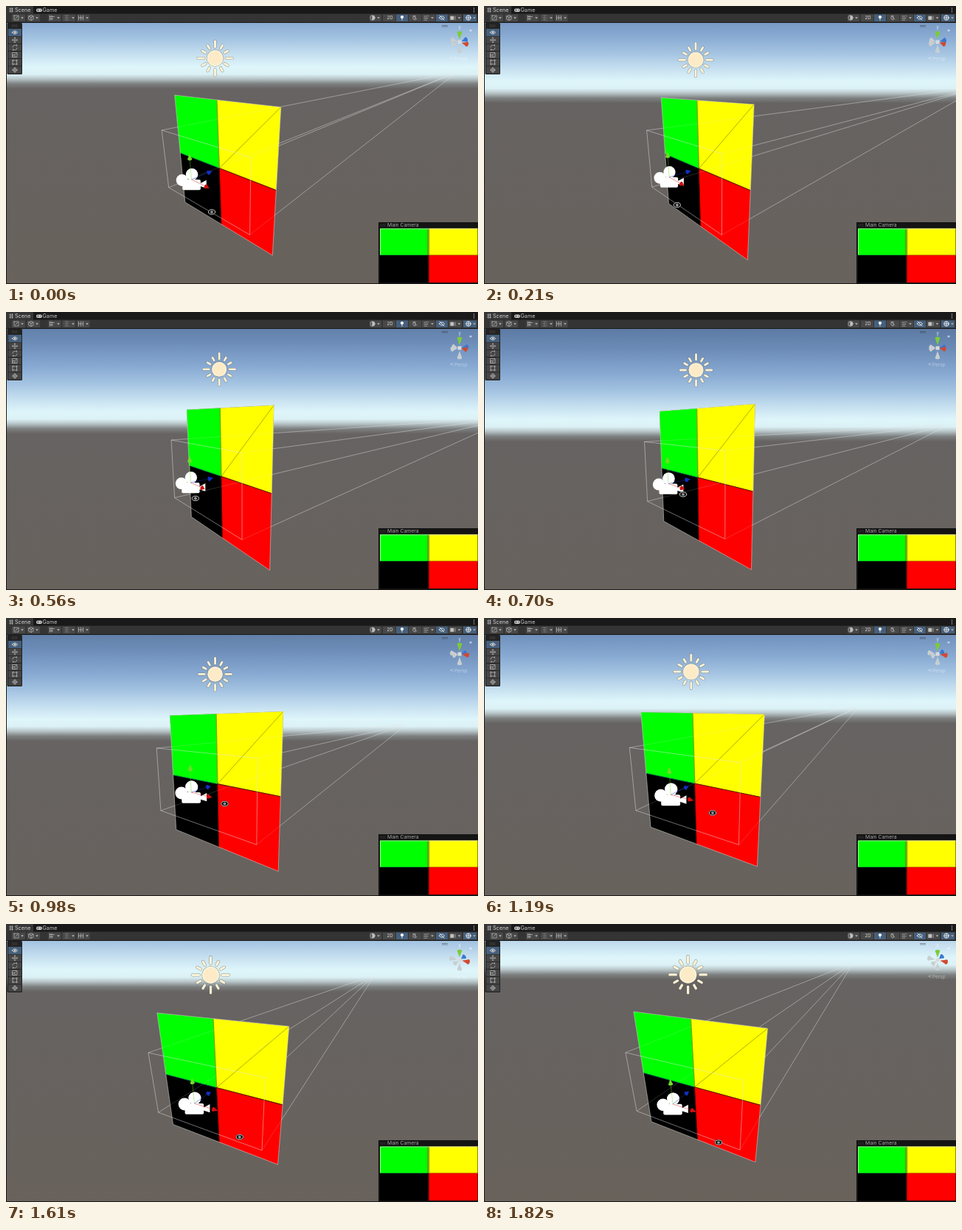
Write an HTML page with a canvas that moves like this. It is 640x378 px and loops after 1.89 s.

```html
<!DOCTYPE html>
<html lang="en">
<head>
<meta charset="utf-8">
<title>Scene orbit</title>
<style>
  html, body { margin: 0; width: 640px; height: 378px; overflow: hidden; background: #282828; }
  canvas, svg { position: absolute; left: 0; top: 0; display: block; }
  text { font-family: Inter, Roboto, sans-serif; }
  .icon { fill: none; stroke: #b4b4b4; stroke-width: .8; stroke-linecap: round; stroke-linejoin: round; }
  .button { fill: #484848; }
  .on { fill: #46607c; }
</style>
</head>
<body>
<canvas id="scene" width="640" height="378"></canvas>
<svg width="640" height="378" viewBox="0 0 640 378">
  <defs>
    <linearGradient id="top">
      <stop offset=".475" stop-color="#0f0"/><stop offset=".495" stop-color="#5c9c00"/>
      <stop offset=".515" stop-color="#ff0"/>
    </linearGradient>
    <linearGradient id="bottom">
      <stop offset=".49" stop-color="#000"/><stop offset=".51" stop-color="#f00"/>
    </linearGradient>
    <path id="caret" d="M-1.8 -.8h3.6L0 1.4z" fill="#bbb"/>
    <path id="eye" d="M-3.6 0Q0 -4.4 3.6 0Q0 4.4 -3.6 0z"/>
  </defs>

  <!-- tabs, toolbar and view border -->
  <rect width="640" height="11" fill="#191919"/>
  <rect width="37" height="11" fill="#363636"/>
  <rect y="10.5" width="640" height="11.5" fill="#343434"/>
  <path d="M0 22.5h640M.5 22v356M0 377.5h640" stroke="#1b1b1b"/>
  <path class="icon" d="M4.5 4h5M4.5 7h5M6 2.5v6M8.5 2.5v6"/>
  <text x="12" y="8.2" font-size="7.2" fill="#d4d4d4">Scene</text>
  <rect x="41" y="3.5" width="8" height="4.5" rx="2.2" fill="#c8c8c8"/>
  <path d="M42.5 5.7h2M43.5 4.7v2M46 5.7h1.5" stroke="#222" stroke-width=".7"/>
  <text x="49.5" y="8.2" font-size="7.2" fill="#c8c8c8">Game</text>
  <path d="M634.5 2.5v6" stroke="#c8c8c8" stroke-width="1.2" stroke-dasharray="1.2 1.2"/>

  <g class="button">
    <rect x="8" y="11.5" width="18" height="9.5"/><rect x="28.5" y="11.5" width="17.5" height="9.5"/>
    <rect x="57" y="11.500" width="17.500" height="9.500"/><rect x="76.500" y="11.500" width="17.500" height="9.500"/>
    <rect x="96" y="11.500" width="17.500" height="9.500"/><rect x="493" y="11.500" width="16" height="9.500"/>
    <rect x="511" y="11.500" width="17" height="9.500"/><rect x="546" y="11.500" width="17" height="9.500"/>
    <rect x="564" y="11.500" width="18" height="9.500"/><rect x="600" y="11.500" width="18" height="9.500"/>
  </g>
  <g class="on">
    <rect x="529" y="11.500" width="16" height="9.500"/>
    <rect x="583" y="11.500" width="16" height="9.500"/>
    <rect x="620" y="11.500" width="18" height="9.500"/>
  </g>
  <g class="icon">
    <rect x="11" y="13" width="6" height="6" stroke-dasharray="1.5 1"/><path d="M13 17l3 -3"/>
    <path d="M31 14l3 -1.5l3 1.5v4l-3 1.5l-3 -1.5zM31 14l3 1.5l3 -1.5M34 15.5v4"/>
    <path d="M59.5 13v6M62 13v6M59.5 14.5h6M59.5 17.5h4"/>
    <path d="M80 13h5M80 16h5M80 19h5M82 13v6" stroke="#777"/>
    <path d="M98.5 13v6M101.5 13v6M104.5 13v6M98.5 16h6"/>
    <circle cx="497" cy="16" r="3.2"/><path d="M497 13a3 3 0 0 1 0 6z" fill="#c4c4c4"/>
    <circle cx="537" cy="15" r="1.7" fill="#fff" stroke="#fff"/><path d="M537 17v2.2" stroke="#fff"/>
    <path d="M552 14.5v3l3 1.5v-5.5zM557 18l-5 -5"/>
    <path d="M567 14h4M567 16.5h5M567 19h4M572 13l1 1"/>
    <use href="#eye" x="591" y="16" stroke="#fff"/><path d="M588 13l6 6" stroke="#fff"/>
    <rect x="603" y="14" width="4" height="4.5" fill="#c4c4c4"/><path d="M609 14v4.5"/>
    <circle cx="627" cy="16" r="3.2" stroke="#fff"/><path d="M624 16h6M627 13v6" stroke="#fff"/>
  </g>
  <use href="#caret" x="22" y="16"/><use href="#caret" x="42" y="16"/>
  <use href="#caret" x="71" y="16"/><use href="#caret" x="91" y="16"/>
  <use href="#caret" x="110" y="16"/><use href="#caret" x="505" y="16"/>
  <use href="#caret" x="578" y="16"/><use href="#caret" x="614.5" y="16"/>
  <use href="#caret" x="635" y="16"/>
  <text x="516.5" y="18.3" font-size="6" fill="#ddd">2D</text>

  <!-- tool strip -->
  <rect x="1.5" y="23" width="20.5" height="70" rx="1.5" fill="#232323"/>
  <path d="M8 26h8M8 28h8" stroke="#555" stroke-dasharray="1 1"/>
  <path d="M12 41.5v50.500" stroke="#454545" stroke-width="18" stroke-dasharray="9.400 .8"/>
  <rect class="on" x="3" y="31" width="18" height="10"/>
  <g class="icon" transform="translate(12 36)">
    <use href="#eye" stroke="#eee"/><circle r="1.2" fill="#eee"/>
    <path d="M-3.5 10.3h7M0 6.8v7M-1 7.8l1 -1l1 1M-1 12.8l1 1l1 -1M-2.5 9.3l-1 1l1 1M2.5 9.3l1 1l-1 1"/>
    <path d="M-3 20a3 3 0 0 1 5.5 -1.5v-2M3 21a3 3 0 0 1 -5.5 1.5v2"/>
    <path d="M-3 27.5h6v6h-6zM-3 33.5v-3h3v3M0 30.5l2 -2"/>
    <path d="M-2.5 38h5v5h-5zM-3.5 38h1v-1M3.5 43h-1v1M2.5 37v1h1M-2.5 44v-1h-1"/>
    <path d="M-3.5 51h7M0 47.5v7"/><circle cy="51" r="2.5"/>
  </g>

  <!-- view widget extras -->
  <path d="M591 26.5h8M591 28h8" stroke="#333" stroke-opacity=".6" stroke-width=".7"/>
  <rect x="628.5" y="32" width="3" height="2.5" fill="#fff" fill-opacity=".55"/>
  <path d="M606.5 69.5l-4 1.5l4 1.5" fill="none" stroke="#fff" stroke-opacity=".4" stroke-width=".8"/>
  <text x="608" y="73.5" font-size="6.5" fill="#fff" fill-opacity=".45">Persp</text>

  <!-- camera preview -->
  <rect x="505" y="294" width="135" height="84" fill="#141414"/>
  <path d="M507.5 297h7M507.5 299h7" stroke="#555" stroke-width=".8" stroke-dasharray="1 1"/>
  <text x="517" y="300.3" font-size="6.8" fill="#a8a8a8">Main Camera</text>
  <rect x="507" y="302.5" width="132.5" height="36.5" fill="url(#top)"/>
  <rect x="507" y="339" width="132.5" height="37" fill="url(#bottom)"/>
  <path d="M507.5 339v-36h132" fill="none" stroke="#e4ecdc" stroke-opacity=".7"/>
  <path d="M507 338.5h67" stroke="#083" stroke-opacity=".6"/>
  <path d="M574 338.700h65.500" stroke="#a40" stroke-opacity=".7"/>
</svg>
<script>
const ctx = document.getElementById('scene').getContext('2d');
const LOOP = 1890, STEP = 70;
const CX = 320, CY = 200, FOCAL = 308.3;

// Pointer drag: time, x, y. Its position sets the orbit angles.
const drag = [
  [0, 279, 280], [420, 250.5, 261], [700, 270, 248], [980, 296.5, 252.5],
  [1190, 310, 265], [1400, 315, 281], [1820, 318, 297]
];

// World units: the orbit pivot is the origin, one unit from the eye.
const MID = [-.1207, -.0985];
const QUAD = { z: -.0279, w: .324, h: .3216 };
const NEAR = { z: -.1429, w: .2885, h: .161 };
const FAR = 60;
const RIG = [...MID, -.19];
const SUN = [-.123, .39, -.027];
const AXES = [
  { dir: [1, 0, 0], color: '#d01010' },
  { dir: [0, 1, 0], color: '#6fdc28' },
  { dir: [0, 0, 1], color: '#1230c0' }
];
const SKY = [
  [-135, '#5a779f'], [-105, '#6a8ab5'], [-70, '#86a8d1'], [-45, '#a5c4e2'],
  [-24, '#c6e0f0'], [-7, '#def5fa'], [3, '#dbf1f5'], [9, '#b9c6c9'],
  [16, '#7d8080'], [23, '#666362'], [330, '#69625b']
];

let sa, ca, sp, cp;

function pointer(t) {
  let i = 0;
  while (i < drag.length - 2 && t >= drag[i + 1][0]) i++;
  const a = drag[i], b = drag[i + 1], span = b[0] - a[0], u = (t - a[0]) / span;
  const slope = (k, c) => {
    const p = drag[Math.max(k - 1, 0)], n = drag[Math.min(k + 1, drag.length - 1)];
    return (n[c] - p[c]) / (n[0] - p[0]) * span;
  };
  return [1, 2].map(c => {
    const m = slope(i, c), n = slope(i + 1, c), d = b[c] - a[c];
    return a[c] + u * (m + u * (3 * d - 2 * m - n + u * (m + n - 2 * d)));
  });
}

function setView([px, py]) {
  const yaw = (27.85 + .355 * (318 - px)) * Math.PI / 180;
  const pitch = (20 + .344 * (py - 281)) * Math.PI / 180;
  sa = Math.sin(yaw); ca = Math.cos(yaw);
  sp = Math.sin(pitch); cp = Math.cos(pitch);
}

function turn([x, y, z]) {
  const side = x * ca + z * sa, depth = z * ca - x * sa;
  return [side, y * cp + depth * sp, depth * cp - y * sp];
}

function project(p) {
  const [x, y, z] = turn(p), w = z + 1;
  return [CX + FOCAL * x / w, CY - FOCAL * y / w, w];
}

// Point on an upright rectangle; u and v run from -1 to 1.
const onRect = (r, u, v, z = r.z) => project([MID[0] + u * r.w, MID[1] + v * r.h, z]);
const corners = [[-1, 1], [1, 1], [1, -1], [-1, -1]];

function trace(pts, close) {
  ctx.beginPath();
  pts.forEach(p => ctx.lineTo(p[0], p[1]));
  if (close) ctx.closePath();
}
function fill(pts, color) { trace(pts, true); ctx.fillStyle = color; ctx.fill(); }
function line(pts, color, width = .8, close = false) {
  trace(pts, close);
  ctx.strokeStyle = color; ctx.lineWidth = width; ctx.stroke();
}
function disc(x, y, r, color) {
  ctx.beginPath(); ctx.arc(x, y, r, 0, 7);
  ctx.fillStyle = color; ctx.fill();
}

function drawSky() {
  const horizon = CY - FOCAL * sp / cp, top = horizon - 135;
  const g = ctx.createLinearGradient(0, top, 0, top + 465);
  SKY.forEach(([y, c]) => g.addColorStop((y + 135) / 465, c));
  ctx.fillStyle = g;
  ctx.fillRect(0, 0, 640, 378);
}

function drawSun() {
  const [x, y, w] = project(SUN);
  ctx.save();
  ctx.translate(x, y);
  ctx.scale(1 / w, 1 / w);
  ctx.lineCap = 'round';
  for (const [color, extra] of [['rgba(90,90,80,.55)', 1], ['#fbf2d6', 0]]) {
    for (let i = 0; i < 12; i++) {
      const a = i * Math.PI / 6, end = i % 3 ? 18.5 : 21.5;
      const c = Math.cos(a), s = Math.sin(a);
      line([[14 * c, 14 * s], [end * c, end * s]], color, 2.8 + extra);
    }
    disc(0, 0, 10.2 + extra / 2, color);
  }
  disc(0, 0, 8.6, '#fdebc8');
  ctx.restore();
}

function drawQuad() {
  const at = (u, v) => onRect(QUAD, u, v);
  const cell = (u, v, color) => fill([at(u, v), at(u + 1, v), at(u + 1, v + 1), at(u, v + 1)], color);
  fill(corners.map(c => at(...c)), '#222');
  cell(-1, 0, '#0f0'); cell(0, 0, '#ff0');
  cell(-1, -1, '#000'); cell(0, -1, '#f00');
  line([at(0, 0), at(0, 1)], '#6ab400', 1.4);
  line([at(0, 0), at(0, -1)], '#600', 1);
  line([at(-1, 0), at(0, 0)], '#064', 1);
  line([at(0, 0), at(1, 0)], '#601800', 1.1);
  line([at(1, 1), at(0, 0)], 'rgba(50,50,0,.55)', .7);
  line(corners.map(c => at(...c)), 'rgba(225,225,215,.55)', 1, true);
}

function drawBeams(alpha) {
  for (const [u, v] of corners) {
    line([onRect(NEAR, u, v), onRect(NEAR, u, v, FAR)], `rgba(225,225,225,${alpha})`);
  }
}

function drawNearFrame() {
  line(corners.map(c => onRect(NEAR, ...c)), 'rgba(225,225,225,.55)', .9, true);
  const [x, y] = onRect(NEAR, 0, 0, FAR);
  ctx.fillStyle = 'rgba(235,235,235,.6)';
  ctx.fillRect(x - 1.5, y - 1, 3, 2);
}

function drawRig() {
  const [x, y, w] = project(RIG);
  ctx.save();
  ctx.translate(x, y);
  ctx.scale(.96 / w, .96 / w);
  disc(.5, -7, 8.4, '#fff');
  disc(-13, 1, 8.2, '#fff');
  ctx.beginPath();
  ctx.roundRect(-12.5, 0, 25, 14.5, 2);
  ctx.fill();
  fill([[11, 6], [20.5, 1], [20.5, 12], [11, 9]], '#fff');
  ctx.restore();

  for (const { dir, color } of AXES) {
    const along = k => project(RIG.map((c, i) => c + dir[i] * k));
    const base = along(.094), tip = along(.117);
    ctx.globalAlpha = .55;
    line([[x, y], base], color);
    ctx.globalAlpha = 1;
    drawCone(base, tip, 3, color);
  }
}

// Cone seen from the side, with a round base so it stays visible end-on.
function drawCone(base, tip, r, color) {
  const dx = tip[0] - base[0], dy = tip[1] - base[1], len = Math.hypot(dx, dy) || 1;
  const nx = -dy / len * r, ny = dx / len * r;
  ctx.beginPath();
  ctx.ellipse(base[0], base[1], r * .6, r, Math.atan2(dy, dx), 0, 7);
  ctx.fillStyle = color; ctx.fill();
  fill([[base[0] + nx, base[1] + ny], tip, [base[0] - nx, base[1] - ny]], color);
}

function drawCompass() {
  const ox = 615, oy = 49, tint = ['#d2492f', '#7ccb3a', '#3b78d0'];
  const arms = AXES.flatMap(({ dir }, i) => [1, -1].map(s => ({
    v: turn(dir.map(c => c * s)), color: s > 0 ? tint[i] : '#c9ced0'
  })));
  arms.push({ v: [0, 0, 0] });
  arms.sort((a, b) => b.v[2] - a.v[2]);
  for (const { v: [x, y], color } of arms) {
    if (!color) {
      ctx.fillStyle = '#d9dcdc';
      ctx.fillRect(ox - 2.5, oy - 2.5, 5, 5);
      continue;
    }
    const at = k => [ox + x * k, oy - y * k];
    drawCone(at(13.5), at(4), 3.2, color);
  }
  ctx.fillStyle = 'rgba(255,255,255,.8)';
  ctx.font = '6px Inter, sans-serif';
  ctx.fillText('y', 613.5, 31);
}

function drawPointer([x, y]) {
  ctx.beginPath();
  ctx.ellipse(x, y, 4.6, 3.1, 0, 0, 7);
  ctx.fillStyle = '#111'; ctx.fill();
  ctx.strokeStyle = '#111'; ctx.lineWidth = 1.6; ctx.stroke();
  ctx.strokeStyle = '#eee'; ctx.lineWidth = .8; ctx.stroke();
  disc(x, y, 1.6, '#eee');
  disc(x, y, .7, '#111');
}

function frame() {
  const t = Math.floor(performance.now() % LOOP / STEP) * STEP;
  const pos = pointer(t);
  setView(pos);
  drawSky();
  drawBeams(.4);
  drawQuad();
  drawBeams(.22);
  drawNearFrame();
  drawSun();
  drawRig();
  drawCompass();
  drawPointer(pos);
  requestAnimationFrame(frame);
}
frame();
</script>
</body>
</html>
```
